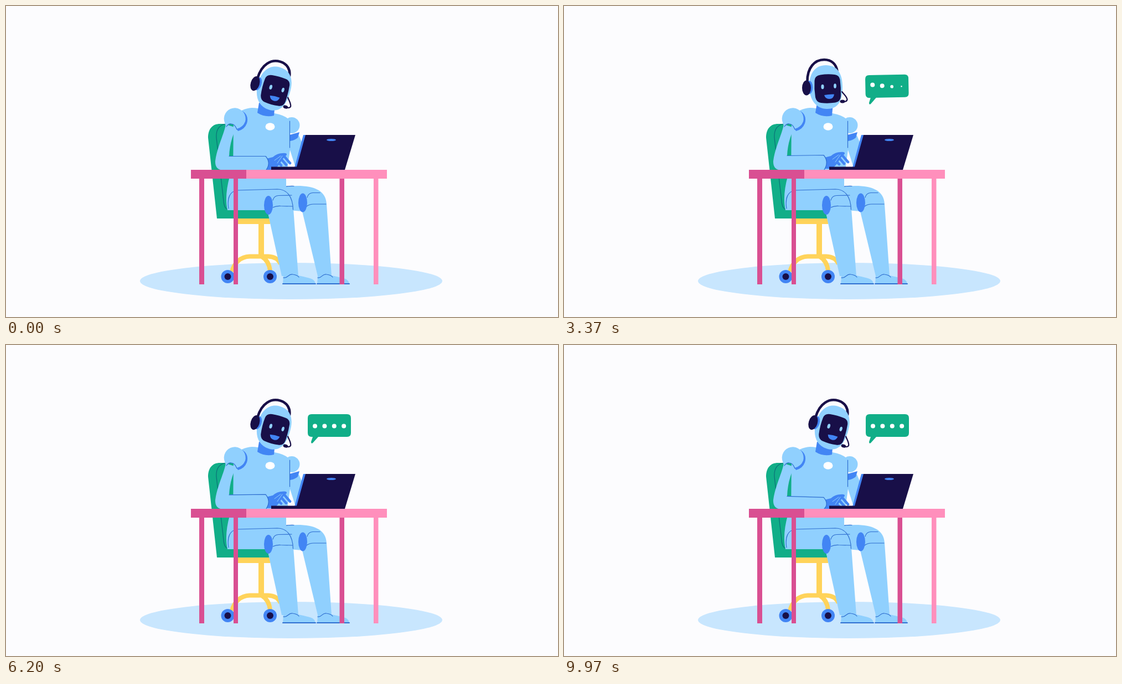
Recreate the animation shown at these times as an HTML page. Size 997 by 562 pixels, loop 10 s.

```html
<!DOCTYPE html>
<html lang="en">
<head>
<meta charset="utf-8">
<title>Robot assistant at a desk</title>
<style>
  html, body { margin: 0; width: 100%; height: 100%; overflow: hidden; background: #fcfcfe; }
  svg { display: block; width: 100vw; height: 100vh; }
  .skin { fill: #90d0fe; }
  .blue { fill: #4285f4; }
  .navy { fill: #180f48; }
  .green { fill: #11ae88; }
  .pink { fill: #ff8fbc; }
  .rose { fill: #d94f92; }
  .white { fill: #fff; }
  .line { fill: none; stroke: #2f6fd0; stroke-width: 1.2; stroke-linecap: round; }
  .wire { fill: none; stroke: #180f48; stroke-linecap: round; }
  .yellow { fill: none; stroke: #ffd35a; stroke-width: 8; }
  .finger { fill: none; stroke: #4285f4; stroke-width: 4.6; stroke-linecap: round; }
</style>
</head>
<body>
<svg viewBox="0 0 997 562">
  <ellipse cx="515" cy="497" rx="273" ry="33" fill="#c8e6fe"/>

  <g id="chair">
    <path class="yellow" d="M408 480C412 464 424 453 440 452.500H474C487 453 493 460 496 466M461 452C471 458 476 467 477 479"/>
    <path class="yellow" style="stroke-width:10" d="M461 390V452M419 389H477"/>
    <g id="wheels">
      <circle class="blue" cx="400.500" cy="489" r="12"/><circle class="navy" cx="400.500" cy="489" r="6"/>
      <circle class="blue" cx="477" cy="489" r="12"/><circle class="navy" cx="477" cy="489" r="6"/>
    </g>
    <path class="green" d="M365 238C365 221 374 213 386 213H416V366H484V384H381Z"/>
    <path class="line" style="stroke:#0b6f78" d="M397 213C386 215 379 223 380 238L393 352Q394 367 402 368"/>
  </g>

  <g id="far-arm">
    <path class="skin" d="M512 238L529 234L541 262L530 292H523L512 257Z"/>
    <path class="blue" d="M512 233L530 228L527 238Q521 243 513 244Z"/>
    <circle class="skin" cx="516" cy="215.500" r="14.500"/>
  </g>

  <g id="legs">
    <path class="skin" d="M488 328L506 326C548 322 578 329 579 358L588 488H563L535 371L500 368Z"/>
    <path class="skin" d="M563 487Q575 481 588 487Q598 489 610 492Q620 495 620 503H562Z"/>
    <path class="line" d="M486 331Q498 325 520 325.500M544 346Q546 338 554 337.500H567M543 362Q548 358 556 358H578M563 491C570 493 571 483 579 485Q587 486 590 490"/>
    <path class="line" style="stroke-width:2" d="M562 502H620"/>
    <ellipse class="blue" cx="536" cy="355.500" rx="8" ry="17"/>
    <path class="skin" d="M404 308H506V328C515 338 519 350 519 366L528 488H498L473 374L468 369H400C396 350 398 330 404 308Z"/>
    <path class="skin" d="M501 487Q514 481 528 487Q538 489 549 492Q559 495 559 503H500Z"/>
    <path class="line" d="M402 366C399 347 404 335 418 333L490 331C508 331 518 345 518.500 368M482 351Q484 343 492 342.500L516 342M482 364Q488 361 496 361.500L518 362M501 491C509 493 510 483 518 485Q526 486 529 490"/>
    <path class="line" style="stroke-width:2" d="M500 502H559"/>
    <ellipse class="blue" cx="474" cy="360" rx="8" ry="17"/>
  </g>

  <path class="skin" d="M411 200Q425 185 444 184Q456 184 470 189L485 194Q507 198 513 208V260L506 312H410Z"/>
  <path class="line" d="M512.500 208V256"/>
  <path class="blue" d="M457 175H486L484 198Q468 202 454 193Z"/>
  <ellipse class="white" cx="477" cy="218" rx="8.500" ry="6.700"/>

  <g id="head">
    <path class="wire" stroke-width="4.600" d="M439.500 137C439 111 453 97 470 97C483 97 492 105 493.500 118"/>
    <path class="skin" d="M443 145C443 121 454 107 473 107C493 107 503 121 503 147C503 173 494 186 475 186C455 186 443 169 443 145Z"/>
    <ellipse class="blue" cx="443" cy="147" rx="6.500" ry="12"/>
    <ellipse class="navy" cx="438" cy="148" rx="8" ry="13.500"/>
    <path class="navy" d="M463 124.500Q476 122.500 489 124Q497 125 498.500 133Q500.500 148 500 163Q499.500 173 490 174.500Q477 176.500 464 175Q456 174 454 165Q451.500 150 452.500 135Q453 126 463 124.500Z"/>
    <ellipse class="skin" cx="467" cy="146" rx="2.600" ry="4.200"/>
    <ellipse class="skin" cx="489.500" cy="144.500" rx="2.400" ry="4.200"/>
    <path class="blue" d="M470 161Q479 159 488 159.500Q487 168 479 168Q472 168 470 161Z"/>
    <path class="wire" stroke-width="2.200" d="M502 155C506 160 511 164 511.500 169Q511 173 504 173"/>
    <ellipse class="navy" cx="503" cy="172.500" rx="4.500" ry="3"/>
  </g>

  <g id="hand">
    <path class="blue" d="M470 276L482 273Q490 266 499 266Q508 265 507 269L500 276L494 286L485 296H470Z"/>
    <path class="finger" d="M486 277L497 288M494 273L506 287M501 270L513 284"/>
    <path d="M485 279L496 271M490 284L499 271" fill="none" stroke="#90d0fe" stroke-linecap="round"/>
  </g>
  <path id="arm" class="skin"/>
  <path id="crease" class="line"/>
  <g id="shoulder">
    <path class="blue" d="M425 189C435 193 438 203 435 212Q431 223 419 226L414 218Z"/>
    <path class="skin" d="M394 207A19.500 19.500 0 1 1 432 209Q428 219 417 222Q413 212 404 213L398 218Q395 213 394 207Z"/>
    <path class="line" d="M398 218Q402 212 407 213Q413 213 417 223"/>
  </g>

  <g id="laptop">
    <path class="blue" d="M537 233H544L528 292H521Z"/>
    <path class="navy" d="M541 233H631L612 296H479V290.500H525Z"/>
    <ellipse class="blue" cx="587.500" cy="242" rx="8.500" ry="2"/>
  </g>

  <g id="table">
    <path class="pink" d="M434 296H688V312H434ZM664 312H672.500V503H664Z"/>
    <path class="rose" d="M334 296H434V312H334ZM349 312H358V503H349ZM411 312H419V503H411ZM602.500 312H611V503H602.500Z"/>
  </g>

  <g id="bubble">
    <path class="green" d="M552 125H616Q623 125 623 132V159Q623 166 616 166H564L554 177Q551 179 551 175L554 166H552Q545 166 545 159V132Q545 125 552 125Z"/>
    <g id="dots"></g>
  </g>
</svg>
<script>
  const LOOP = 10, CYCLE = 4;
  const el = id => document.getElementById(id);
  const set = (node, name, value) => node.setAttribute(name, value);
  const clamp = v => Math.min(1, Math.max(0, v));
  const ease = v => { v = clamp(v); return v * v * (3 - 2 * v); };

  // Eased interpolation through [time, value] pairs.
  function track(keys, t) {
    const i = keys.findIndex(k => k[0] > t);
    if (i < 0) return keys[keys.length - 1][1];
    if (i === 0) return keys[0][1];
    const [t0, v0] = keys[i - 1], [t1, v1] = keys[i];
    return v0 + (v1 - v0) * ease((t - t0) / (t1 - t0));
  }

  const elbowKeys = [[0, 0], [.85, 16], [1.02, 16], [1.2, 8.5], [1.6, 0]];
  const handKeys = [[0, 0], [.6, 12], [.9, 9], [1.06, 9], [1.14, 12], [1.6, 11], [2.3, -2], [3.7, -2], [4, 0]];
  const tiltKeys = [[0, 0], [.4, 17], [2.4, 17], [2.8, 0]];

  const dots = [0, 1, 2, 3].map(i => {
    const dot = document.createElementNS('http://www.w3.org/2000/svg', 'circle');
    set(dot, 'class', 'white');
    set(dot, 'cx', 558 + 17.4 * i);
    return el('dots').appendChild(dot);
  });

  function drawArm(x, h) {
    const sx = x * .18, top = 271.5 + h * .5, end = 271.5 + h, wrist = 469 + x;
    set(el('arm'), 'd', `M${397 + sx} 214C${393 + x * .4} 234 ${381 + x} 256 ${378 + x} 280
      Q${377 + x} 297 ${394 + x} 297H${wrist}Q${wrist + 10} ${end + 12} ${wrist} ${end}
      L${403 + x * 1.6} ${top}Q${404 + x} 244 ${416 + sx} 220Z`);
    set(el('crease'), 'd', `M${403 + x * 1.6} ${top}L${wrist} ${end}Q${wrist + 10} ${end + 12} ${wrist + 1} 296`);
    set(el('hand'), 'transform', `translate(${x} ${h})`);
    set(el('shoulder'), 'transform', `translate(${sx} 0)`);
  }

  function drawBubble(t) {
    const pop = track([[2.85, 0], [3.25, 1]], t);
    const turn = track([[2.85, 14], [3.34, -1.2], [3.6, 0]], t);
    set(el('bubble'), 'transform',
      `translate(552 178) rotate(${turn}) scale(${pop}) translate(-552 -178)`);
    const wave = t < 3.24 ? -1 : (t - 3.24) % 1.5;
    dots.forEach((dot, i) => {
      const hop = clamp((wave - i * .08) / .36);
      set(dot, 'cy', 146.5 - 4.3 * Math.sin(Math.PI * hop));
      set(dot, 'r', 4 * clamp((t - 3.07 - i * .08) / .2));
    });
  }

  function frame() {
    const t = performance.now() / 1000 % LOOP, p = t % CYCLE;
    const tilt = t < 2.4 ? 17 : track(tiltKeys, p);
    set(el('head'), 'transform', `rotate(${tilt} 470.5 184)`);
    drawArm(track(elbowKeys, p), track(handKeys, p));
    drawBubble(t);
    requestAnimationFrame(frame);
  }
  frame();
</script>
</body>
</html>
```
